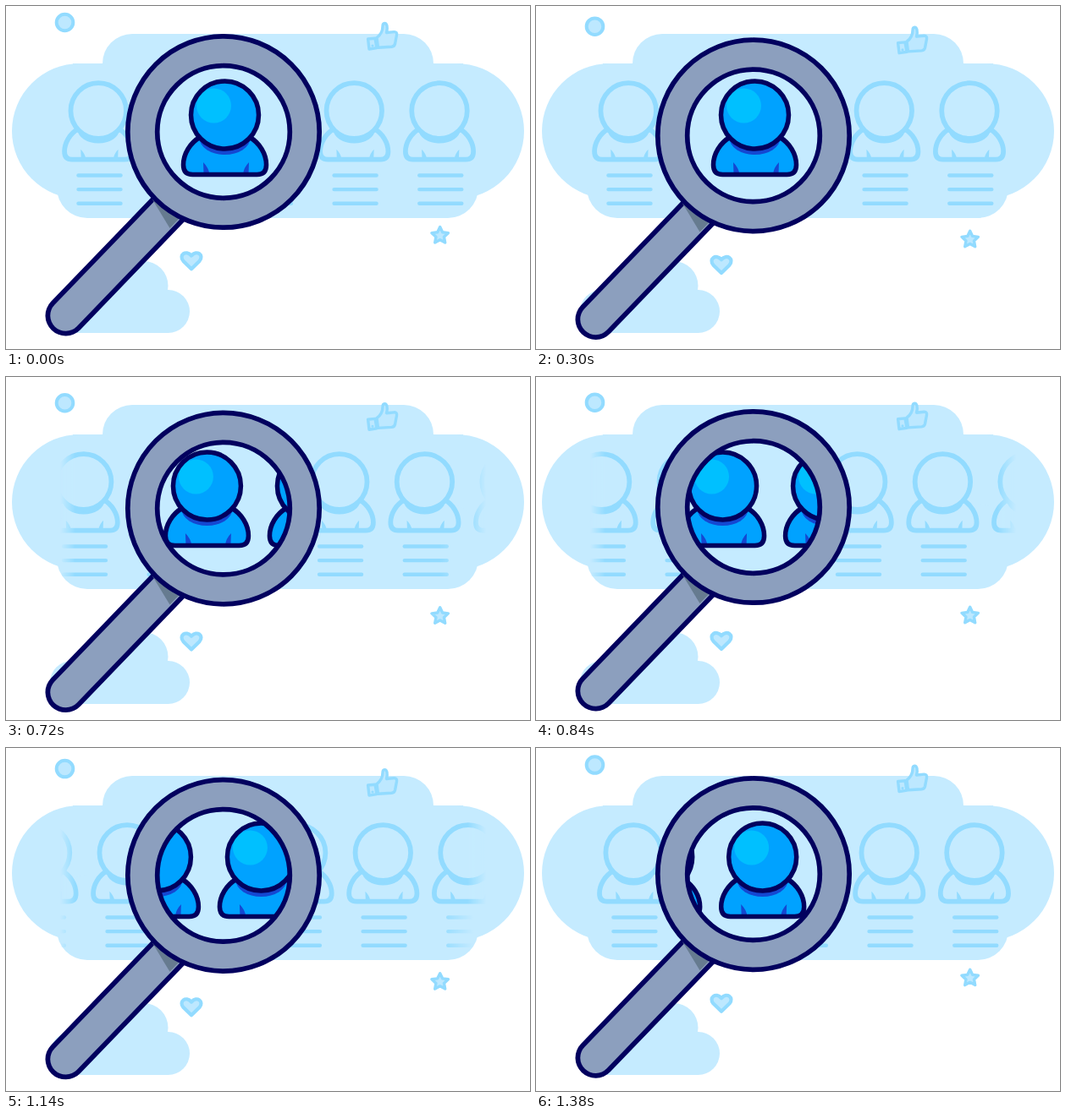
An HTML page for the animation above (1410 ms loop, 619 by 406 pixels).

```html
<!DOCTYPE html>
<html lang="en">
<head>
<meta charset="utf-8">
<title>People search</title>
<style>
  html, body { margin: 0; width: 100%; height: 100%; overflow: hidden; background: #fff; }
  svg { display: block; width: 619px; height: 406px; }
</style>
</head>
<body>
<svg viewBox="0 0 619 406" xmlns="http://www.w3.org/2000/svg">
  <defs>
    <linearGradient id="fadeHead" gradientUnits="userSpaceOnUse" x1="64" y1="0" x2="567" y2="0">
      <stop offset="0" stop-color="#000"/>
      <stop offset=".035" stop-color="#fff"/>
      <stop offset=".957" stop-color="#fff"/>
      <stop offset="1" stop-color="#000"/>
    </linearGradient>
    <linearGradient id="fadeLine" gradientUnits="userSpaceOnUse" x1="64" y1="0" x2="552" y2="0">
      <stop offset="0" stop-color="#000"/>
      <stop offset=".036" stop-color="#fff"/>
      <stop offset=".92" stop-color="#fff"/>
      <stop offset="1" stop-color="#000"/>
    </linearGradient>
    <mask id="softHead" maskUnits="userSpaceOnUse" x="0" y="0" width="619" height="406">
      <rect x="64" y="60" width="503" height="200" fill="url(#fadeHead)"/>
    </mask>
    <mask id="softLine" maskUnits="userSpaceOnUse" x="0" y="0" width="619" height="406">
      <rect x="64" y="60" width="488" height="200" fill="url(#fadeLine)"/>
    </mask>
    <mask id="crop" maskUnits="userSpaceOnUse" x="0" y="0" width="619" height="406">
      <rect x="64" y="60" width="502" height="200" fill="#fff"/>
    </mask>
    <clipPath id="lens"><circle id="lensHole" cx="257" cy="149" r="79"/></clipPath>
  </defs>

  <g fill="#c5ebff">
    <rect x="114" y="33" width="391" height="150" rx="35"/>
    <path d="M79 68H540V228H79Z"/>
    <rect x="7" y="68" width="605" height="160" rx="80"/>
    <rect x="60" y="150" width="498" height="101" rx="36"/>
    <path d="M107 33M114 68"/>
    <rect x="100" y="302" width="91.5" height="58" rx="29"/>
    <rect x="52" y="336" width="165" height="51" rx="25.5"/>
  </g>

  <g id="headMask"><g id="crowd"></g></g>
  <g id="lineMask"><g id="notes" stroke="#92dbff" stroke-width="4.4" stroke-linecap="round"></g></g>

  <g id="icons" fill="#bde8ff" stroke="#92dbff" stroke-width="3.4" stroke-linejoin="round">
    <circle cx="69.5" cy="19.5" r="9.8" stroke-width="4"/>
    <path d="M427.6 39L436 38.2L438 49.6L429 51Z"/>
    <path d="M438 37.5C442 34.500 445 29 445 24C445 19.500 449 19.500 450 23.500C450.700 26.500 450.200 29 449.500 31.500L458.500 30.600C461 30.500 462 32 461.500 34.500L459.500 45C459 47 457.500 48 455.500 48.200L439.500 49.200Z"/>
    <circle cx="433" cy="47" r=".8" stroke-width="1.5"/>
    <path d="M219 311.300L209.500 302C203.500 295 212.500 288 219 295.500C225.500 288 234.500 295 228.500 302Z" stroke-width="4.2"/>
    <path id="star"/>
  </g>

  <circle class="drop" cx="257" cy="149" r="80" fill="#c5ebff"/>
  <g clip-path="url(#lens)"><g id="focus"></g></g>

  <g class="drop" fill="none">
    <g stroke-linecap="round">
      <path d="M70.500 366.500L195 237" stroke="#02005e" stroke-width="48"/>
      <path d="M70.500 366.500L195 237" stroke="#8c9fbe" stroke-width="36.500"/>
    </g>
    <path d="M173 229L193.500 263L205 251L190 225Z" fill="#667b90"/>
    <circle cx="257" cy="149" r="96" stroke="#8c9fbe" stroke-width="35"/>
    <g stroke="#02005e" stroke-width="5.700">
      <circle cx="257" cy="149" r="113.200"/>
      <circle cx="257" cy="149" r="78.300"/>
    </g>
  </g>
</svg>
<script>
const $ = id => document.getElementById(id);
const LOOP = 1410, STEP = 30, SLIDE = 570;
const BODY = 'M-29 26C-41 33 -49 46 -49 59C-49 67 -45 70.5 -38 70.5H38' +
  'C45 70.5 49 67 49 59C49 46 41 33 29 26Z';
const FOLDS = 'M-25.500 56L-25 70H-18Q-19.500 62 -25.500 56Z' +
  'M28.500 56L28 70H21.500Q22.500 62 28.500 56Z';

function person(x, y, scale, c) {
  const shine = c.shine ? `<circle cx="-13" cy="-11" r="20.5" fill="${c.shine}"/>` : '';
  return `<g transform="translate(${x} ${y}) scale(${scale})" stroke-width="${c.width}">
    <path d="${BODY}" fill="${c.fill}"/>
    <path d="${FOLDS}" fill="${c.shade}"/>
    <ellipse cy="27" rx="30" ry="20" fill="${c.shade}"/>
    <path d="${BODY}" fill="none" stroke="${c.line}" stroke-linejoin="round"/>
    <circle r="40" fill="${c.fill}"/>${shine}
    <circle r="40" fill="none" stroke="${c.line}"/>
  </g>`;
}

const range = (n, f) => Array.from({ length: n }, (_, i) => f(i)).join('');
const pale = { fill: '#c5ebff', line: '#92dbff', shade: '#92dbff', width: 7 };
const vivid = { fill: '#00a2ff', line: '#02005e', shade: '#1448d2', shine: '#00c0ff', width: 5.5 };

$('crowd').innerHTML = range(6, i => person(109.2 + i * 100.7, 124, 0.819, pale));
$('notes').innerHTML = range(6, i => range(3, j =>
  `<path d="M${85.5 + i * 100.7} ${200.5 + j * 16.6}h50"/>`));
$('focus').innerHTML = range(2, i => person(258.5 + i * 123, 129, 1, vivid));

$('star').setAttribute('d', 'M' + Array.from({ length: 10 }, (_, i) => {
  const a = i * Math.PI / 5 - Math.PI / 2, r = i % 2 ? 5 : 10.2;
  return `${(512.7 + r * Math.cos(a)).toFixed(2)} ${(271.8 + r * Math.sin(a)).toFixed(2)}`;
}).join('L') + 'Z');

const drops = document.querySelectorAll('.drop');
const move = (el, x, y) => el.setAttribute('transform', `translate(${x} ${y})`);

function glassY(t) {
  const peak = 585, h = 8.6;
  if (t < peak) return h * t / peak;
  const u = (t - peak) / (LOOP - peak);
  return h * (1 - u * (1.5 - 0.5 * u));
}

function iconY(t) {
  const peak = 770, h = 12;
  return t < peak ? h * t / peak : h * (LOOP - t) / (LOOP - peak);
}

function draw(t) {
  const y = glassY(t), slide = Math.max(0, t - SLIDE);
  drops.forEach(el => move(el, 0, y));
  $('lensHole').setAttribute('cy', 149 + y);
  move($('icons'), 0, iconY(t));
  move($('focus'), -slide * 0.1405, 0);
  move($('crowd'), -slide * 0.117, 0);
  move($('notes'), -slide * 0.117, 0);
  const soft = t >= SLIDE && t < 1300;
  $('headMask').setAttribute('mask', soft ? 'url(#softHead)' : 'url(#crop)');
  $('lineMask').setAttribute('mask', soft ? 'url(#softLine)' : 'url(#crop)');
}

let start;
function tick(now) {
  start ??= now;
  draw(Math.floor((now - start) % LOOP / STEP) * STEP);
  requestAnimationFrame(tick);
}
draw(0);
requestAnimationFrame(tick);
</script>
</body>
</html>
```
